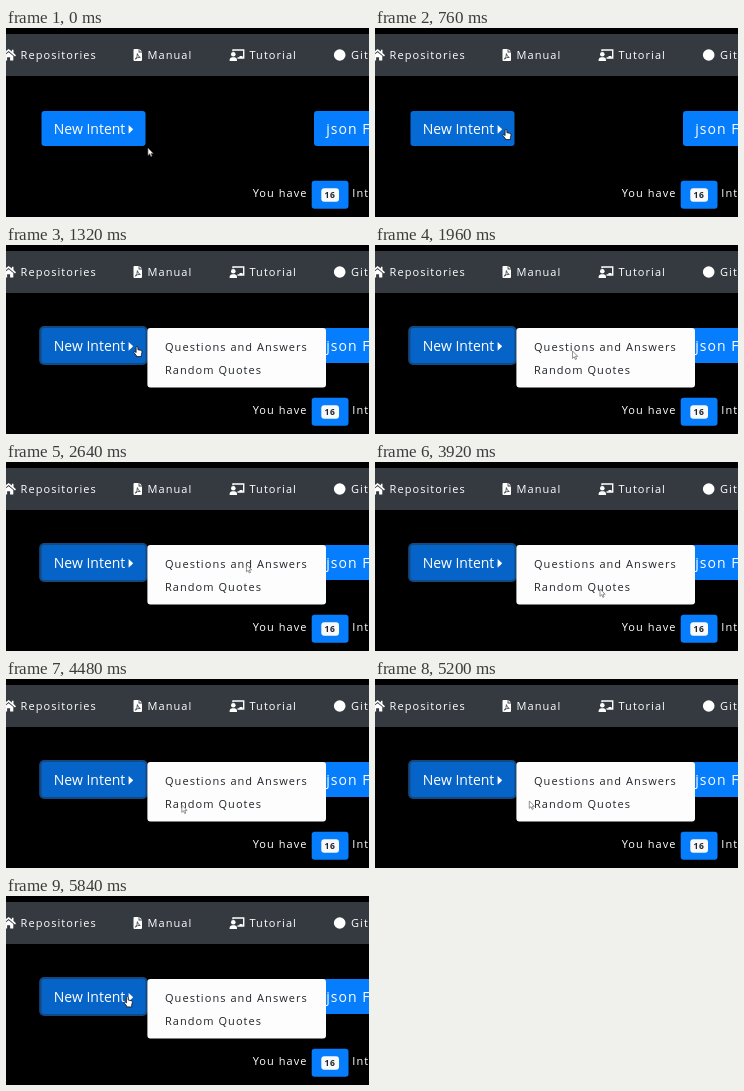
Write an HTML page that moves like this. It is 363 px wide and 189 px high and loops after 6000 ms.

```html
<!DOCTYPE html>
<html lang="en">
<head>
<meta charset="utf-8">
<title>New intent menu</title>
<style>
  html, body { margin: 0; width: 100%; height: 100%; overflow: hidden; background: #000; }
  svg { display: block; width: 363px; height: 189px; }
  text { font: 500 11px "Open Sans", "Noto Sans", sans-serif; letter-spacing: 1.05px; fill: #fff; white-space: pre; }
  .large { font-size: 14px; font-weight: 400; letter-spacing: 1px; }
  .tight { letter-spacing: 0; }
  .dark { fill: #212529; }
  .badge { font-size: 8.5px; font-weight: 700; letter-spacing: .6px; }
  .blue { fill: #067dfd; }
</style>
</head>
<body>
<svg viewBox="0 0 363 189" xmlns="http://www.w3.org/2000/svg">
  <rect width="363" height="189"/>
  <rect y="6" width="363" height="42" fill="#343a40"/>

  <g id="icons" fill="#fff">
    <path d="M-5 27.2 2.6 20.9 5.9 23.6V21.7H7.5V25L10 27.2 9 28.4 2.6 23.1-4 28.4Z"/>
    <path d="M-2 28 2.6 24.2 7.3 28V32.6H4.1V29.2H1.1V32.6H-2Z"/>
    <path d="M128.5 21H132.6V24.4H136V32Q136 33 135 33H128.5Q127.5 33 127.5 32V22Q127.5 21 128.5 21ZM133.4 21 136 23.6H133.4Z"/>
    <path d="M129.3 31.2Q131.6 28.6 131.4 25.6Q132 28.8 134.3 29.4Q131.5 29 129.3 31.2Z" fill="none" stroke="#343a40" stroke-width=".8"/>
    <path d="M227 23.2V22H237.7V30H231.5" fill="none" stroke="#fff" stroke-width="1.4"/>
    <path d="M233.5 28H236.5V30H233.5Z"/>
    <circle cx="227.3" cy="26.3" r="2.3"/>
    <path d="M223.6 33V31.8Q223.8 29.4 226 29.3H228.7Q230.9 29.4 231 31.8V33Z"/>
    <circle cx="333.7" cy="27" r="5.8"/>
  </g>

  <text x="14.6" y="31.2">Repositories</text>
  <text x="141.6" y="31.2">Manual</text>
  <text x="243.5" y="31.2">Tutorial</text>
  <text x="345" y="31.2">Git</text>

  <rect class="blue" x="308" y="83" width="70" height="35" rx="3"/>
  <text class="large" x="320.3" y="106.2">json F</text>

  <text x="246.7" y="169.3">You have</text>
  <rect class="blue" x="305.7" y="152.7" width="36.8" height="28" rx="3"/>
  <rect x="315.3" y="160.3" width="17.7" height="13.4" rx="3" fill="#f8f9fa"/>
  <text class="dark badge" x="318.6" y="170.2">16</text>
  <text x="346.3" y="169.3">Int</text>

  <rect id="ring" x="33.2" y="81" width="108.5" height="39" rx="5" fill="#268fff"/>
  <rect id="button" x="35.5" y="83" width="104" height="35" rx="3"/>
  <text class="large tight" x="47.8" y="106.2">New Intent</text>
  <path d="M122.6 96.9 127.2 101.3 122.6 105.7Z" fill="#fff"/>

  <g id="menu">
    <rect x="141.4" y="83" width="178.6" height="59.5" rx="3" fill="#fdfdfe"/>
    <text class="dark" x="159" y="105.8">Questions and Answers</text>
    <text class="dark" x="159" y="129.2">Random Quotes</text>
  </g>

  <path id="arrow" d="M0 0V7.4L1.7 5.8 2.9 8.5 4.1 8 2.9 5.4H5.2Z" fill="#fff" stroke="#666" stroke-width=".7"/>
  <path id="hand" d="M-.9 .9Q0-.4 .9 .9V3.7L4 4.3Q5.2 4.7 5.1 6L4.4 8.6V10.6H-.6V9.6L-3.1 6.6Q-3.3 5.3-2.1 5.5L-.9 6.6Z" fill="#fff" stroke="#111" stroke-width=".8"/>
</svg>
<script>
const LOOP = 6000, STEP = 40;
const MENU_OPENS = 800, HOVER_STARTS = 120, FADE = 150;

// Pointer stops: time in ms, x, y
const path = [
  [0, 142, 120], [480, 131, 101], [1320, 131, 101], [1600, 161, 109],
  [1920, 193.5, 107], [1960, 197.5, 106], [2560, 235, 102], [3200, 278.5, 106],
  [3360, 279.5, 117], [3840, 232, 127], [4480, 175.8, 126], [5120, 159, 125],
  [5760, 121.3, 100.5], [LOOP, 121.3, 100]
];

const el = id => document.getElementById(id);
const [ring, button, menu, arrow, hand] = ["ring", "button", "menu", "arrow", "hand"].map(el);
const mix = (a, b, k) => a + (b - a) * k;
const fade = (t, start) => Math.min(1, Math.max(0, (t - start) / FADE));

function pointerAt(t) {
  const i = path.findIndex(stop => stop[0] > t);
  const [t0, x0, y0] = path[i - 1], [t1, x1, y1] = path[i];
  const k = (t - t0) / (t1 - t0);
  return [mix(x0, x1, k), mix(y0, y1, k)];
}

function show(node, visible) {
  node.style.display = visible ? "" : "none";
}

function render(time) {
  const t = Math.floor((time % LOOP) / STEP) * STEP;
  const [x, y] = pointerAt(t);
  const overButton = x < 140 && y < 118;
  const hover = fade(t, HOVER_STARTS), focus = fade(t, MENU_OPENS);

  const green = mix(mix(125, 106, hover), 99, focus);
  const blue = mix(mix(253, 213, hover), 199, focus);
  button.setAttribute("fill", `rgb(6,${Math.round(green)},${Math.round(blue)})`);
  ring.setAttribute("opacity", focus * .5);
  show(menu, t >= MENU_OPENS);

  show(hand, overButton);
  show(arrow, !overButton);
  (overButton ? hand : arrow).setAttribute("transform", `translate(${x} ${y})`);
}

const start = performance.now();
function tick() {
  render(performance.now() - start);
  requestAnimationFrame(tick);
}
tick();
</script>
</body>
</html>
```
